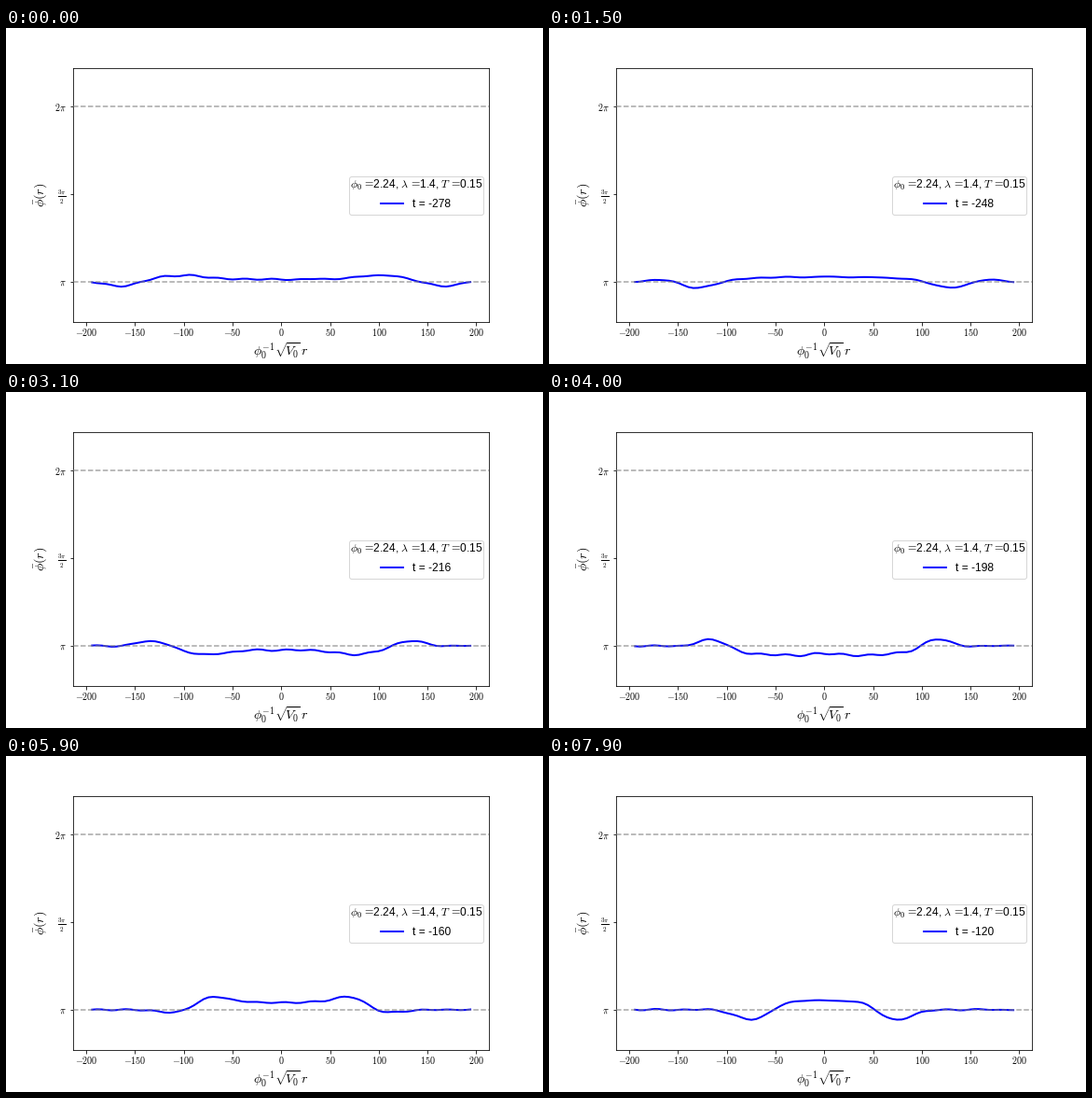
Write a matplotlib script that moves like this. It is 576 px wide and 360 px high and loops after 8000 ms.

```python
import matplotlib.pyplot as plt
import numpy as np
from matplotlib.animation import FuncAnimation
from matplotlib.patches import FancyBboxPatch

plt.rcParams.update({
    "mathtext.fontset": "cm",
    "font.family": "Liberation Sans",
    "font.size": 10,
})

W, H, DPI = 576, 360, 72
FRAMES, INTERVAL = 80, 100
T_START, T_STEP = -278, 2
T_FOCUS = -77.4
R_MAX = 193.9
PX_PER_RAD = 188 / np.pi

r = np.linspace(-R_MAX, R_MAX, 79)
rng = np.random.default_rng(4)
RIPPLES = [(rng.uniform(0.1, 0.24), rng.choice([-1, 1]),
            rng.uniform(0, 2 * np.pi)) for _ in range(6)]


def pulse(center, height, width):
    """Mirrored pair of bell curves."""
    return sum(height * np.exp(-((r - s * center) / width) ** 2 / 2)
               for s in (-1, 1))


def crest(t, s):
    """Radius of a wave crest that closes in on the centre."""
    return np.sqrt(max((T_FOCUS - t) ** 2 - s ** 2, 0))


def core(t):
    """Central plateau: a growing oscillation with a shrinking edge."""
    level = 16.5 * np.exp((t + 144) / 85) * np.sin(np.pi * (t + 172) / 61)
    edge = 47 + 85 * (1 - np.exp((t + 120) / 75))
    return level / 2 * (1 - np.tanh((np.abs(r) - edge) / 14))


def field(t):
    old_hump = 4.7 * np.exp(-(t + 278) / 26)
    old_dip = -7.3 * np.exp(-((t + 252) / 48) ** 2)
    hump = 12.5 * np.exp((t + 180) / 40) / (1 + np.exp((t + 163) / 5))
    dip = -11 * np.exp((t + 120) / 30)
    y = core(t)
    y += pulse(crest(t, 168), old_hump, 28)
    y += pulse(crest(t, 115), old_dip, 18)
    y += pulse(crest(t, 43), hump, 15)
    y += pulse(75 - 0.97 * (t + 120), dip, 15)
    y += sum(0.25 * np.sin(k * (r + d * t) + p) for k, d, p in RIPPLES)
    return np.pi + y / PX_PER_RAD


fig = plt.figure(figsize=(W / DPI, H / DPI), dpi=DPI, facecolor="white")
ax = fig.add_axes([0.125, 0.125, 0.775, 0.755])
ax.set_xlim(-1.1 * R_MAX, 1.1 * R_MAX)
ax.set_ylim(np.pi - 43.2 / PX_PER_RAD, np.pi + 228.6 / PX_PER_RAD)
xticks = range(-200, 201, 50)
ax.set_xticks(xticks, [f"${x}$" for x in xticks])
ax.set_yticks([np.pi, 1.5 * np.pi, 2 * np.pi],
              [r"$\pi$", r"$\frac{3\pi}{2}$", r"$2\pi$"])
ax.tick_params(axis="x", pad=1)
ax.tick_params(axis="y", pad=4)
for level in (np.pi, 2 * np.pi):
    ax.axhline(level, color="gray", alpha=0.7, ls="--", lw=1.5, zorder=3)
curve, = ax.plot([], [], color="b", lw=2, zorder=2)

# Overlay in pixel units for labels and legend
ov = fig.add_axes([0, 0, 1, 1])
ov.set_xlim(0, W)
ov.set_ylim(H, 0)
ov.axis("off")


def put(x, y, s, size, **kw):
    return ov.text(x, y, s, fontsize=size, va="baseline", **kw)


put(295.2, 351,
    r"$\phi_0^{-1}\sqrt{\hspace{-0.2}V_0\hspace{-0.15}}\hspace{0.25}r$",
    14, ha="center")
put(41, 179, r"$\bar{\phi}(r)$", 14, ha="center", rotation=90,
    rotation_mode="anchor")

ov.add_patch(FancyBboxPatch((368.5, 159.5), 144, 41,
                            boxstyle="round,pad=0,rounding_size=2.4",
                            fc="white", ec="0.8", lw=1, alpha=0.8))
eq = r"\hspace{0.12}=\hspace{-0.2}"
put(440.2, 172, rf"$\phi_0{eq}$2.24, $\lambda{eq}$1.4, $T{eq}$0.15", 12,
    ha="center")
ov.plot([402, 426], [188, 188], color="b", lw=2)
label = put(435.6, 192, "", 12, ha="left")


def update(i):
    t = T_START + T_STEP * i
    curve.set_data(r, field(t))
    label.set_text(f"t = {t}")
    return curve, label


anim = FuncAnimation(fig, update, frames=FRAMES, interval=INTERVAL,
                     repeat=True)
plt.show()
```
